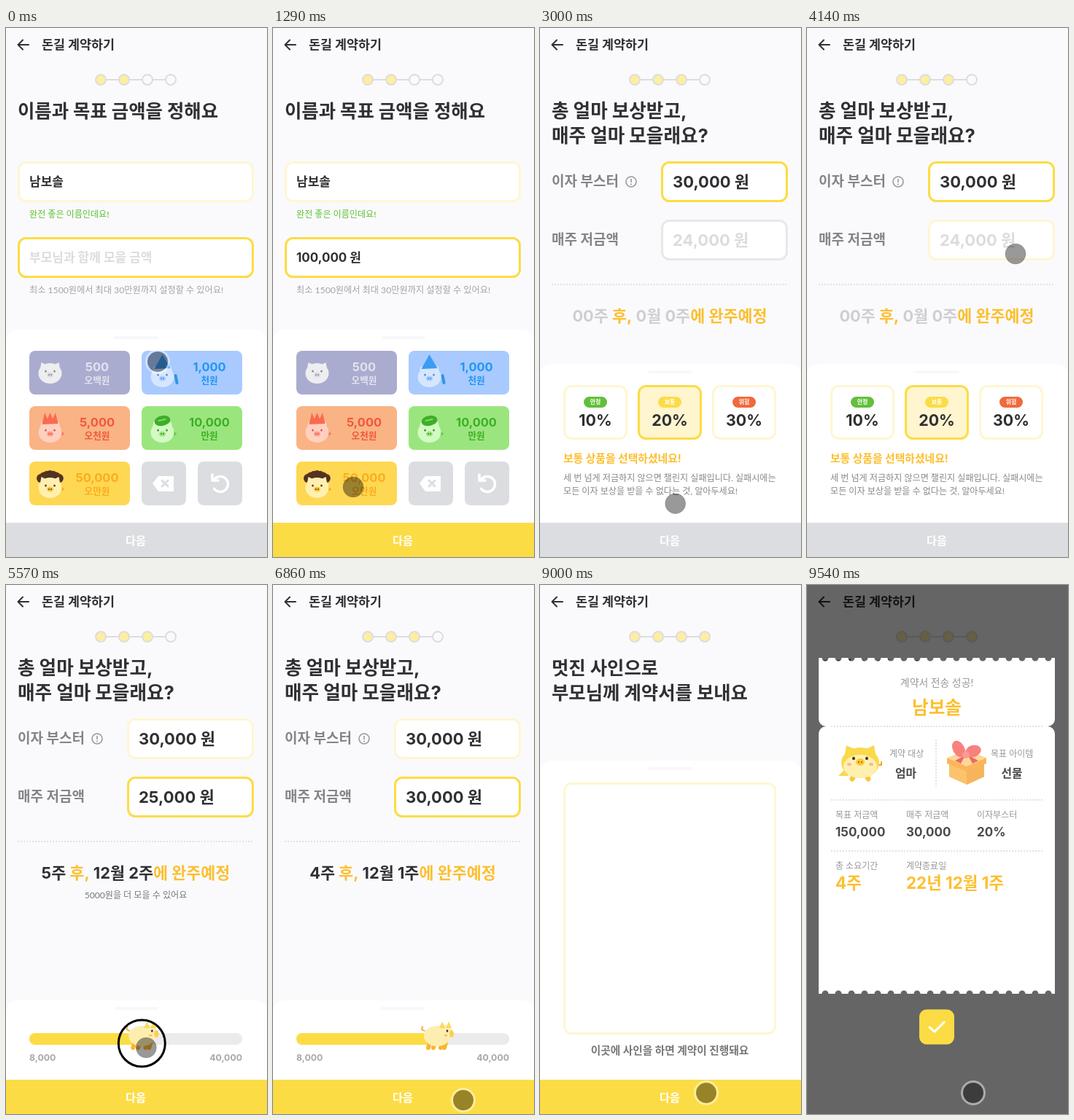
Write an HTML page with a canvas that moves like this. It is 358 by 726 pixels and loops after 9.8 s.

```html
<!DOCTYPE html>
<html lang="ko">
<head>
<meta charset="utf-8">
<title>돈길 계약하기</title>
<style>
html, body { margin: 0; width: 100%; height: 100%; overflow: hidden; background: #fafafc; }
canvas { display: block; width: 358px; height: 726px; }
</style>
</head>
<body>
<canvas id="stage"></canvas>
<script>
const W = 358, H = 726, LOOP = 9800, STEP = 1000 / 7;
const INK = '#303034', YELLOW = '#fcdc45', PALE = '#fff6d2', GOLD = '#fdbf2f', GRAY = '#dcdde1';
const NAME = '남보솔';
const canvas = document.getElementById('stage');
const c = canvas.getContext('2d');
const dpr = window.devicePixelRatio || 1;
canvas.width = W * dpr;
canvas.height = H * dpr;

// ---------- helpers ----------
const clamp = v => Math.max(0, Math.min(1, v));
const mix = (a, b, p) => a + (b - a) * p;
const part = (t, start, end) => clamp((t - start) / (end - start));
const smooth = p => p * p * (3 - 2 * p);
function ramp(t, start, dur) {
  const p = part(t, start, start + dur);
  return p < .5 ? 4 * p ** 3 : 1 - 4 * (1 - p) ** 3;
}
function setFont(size, weight) {
  c.font = `${weight} ${size}px ${weight >= 700 ? 'Inter' : 'Lato'}, "Noto Sans CJK KR", "Noto Sans CJK", sans-serif`;
}
function text(s, x, cy, size, color, weight = 700, align = 'left') {
  setFont(size, weight);
  c.textAlign = align;
  c.fillStyle = color;
  c.fillText(s, x, cy + size * .365);
}
function box(x, y, w, h, r, fill, stroke) {
  c.beginPath();
  c.roundRect(x, y, w, h, r);
  if (fill) { c.fillStyle = fill; c.fill(); }
  if (stroke) { c.strokeStyle = stroke; c.lineWidth = 3; c.stroke(); }
}
function oval(x, y, rx, ry, fill, rot = 0) {
  c.beginPath();
  c.ellipse(x, y, rx, ry, rot, 0, 7);
  c.fillStyle = fill;
  c.fill();
}
function ring(x, y, r, color, lw) {
  c.beginPath();
  c.arc(x, y, r, 0, 7);
  c.strokeStyle = color;
  c.lineWidth = lw;
  c.stroke();
}
function trace(pts) {
  c.beginPath();
  for (let i = 0; i < pts.length; i += 2) c.lineTo(pts[i], pts[i + 1]);
}
function poly(pts, fill) {
  trace(pts);
  c.fillStyle = fill;
  c.fill();
}
function line(pts, color, lw) {
  trace(pts);
  c.strokeStyle = color;
  c.lineWidth = lw;
  c.stroke();
}
function dotted(x1, y1, x2, y2) {
  c.setLineDash([2, 2]);
  c.lineCap = 'butt';
  line([x1, y1, x2, y2], '#e2e2e5', 2);
  c.setLineDash([]);
  c.lineCap = 'round';
}
function at(x, y, draw, flip = 1) {
  c.save();
  c.translate(x, y);
  c.scale(flip, 1);
  draw();
  c.restore();
}
const mirrored = draw => { at(0, 0, draw); at(0, 0, draw, -1); };
const field = (x, y, w, border) => box(x + 1.5, y + 1.5, w - 3, 53, 10, '#fff', border);

// ---------- moments of the story ----------
const FIRST = 860, TAP_GAP = 250, NEXT = 2004, PICK = 2650, FOCUS = 4280;
const DRAG = 5280, DROP = 5860, TO_SIGN = 6850, SIGN = 7740, SIGNED = 8150, SEND = 9000;

// ---------- pointer: taps with a glide between them ----------
const TAPS = [
  [0, 208, 458], [500, 294, 628],
  ...[0, 1, 2].map(i => [FIRST + i * TAP_GAP, 110, 630]),
  [NEXT, 247, 708], [PICK, 185, 655], [FOCUS, 286, 310], [DRAG, 184, 635],
  [DROP, 231, 635], [TO_SIGN, 261, 707], [SIGN, 204, 394], [SIGNED, 178, 555], [SEND, 228, 697]
];
const dragX = t => 184 + 47 * part(t, DRAG, DROP) ** 2.5;
const knobX = t => dragX(t) - 6;
const dragging = t => t >= DRAG && t < DROP;
const signing = t => t >= SIGN && t < SIGNED;

function signPoint(t) {
  const u = part(t, SIGN, SIGNED), w = 1 - u;
  return [204 * w ** 3 - 129 * u * w * w + 880 * u * u * w + 178 * u ** 3, 394 + 161 * u ** 1.09];
}
function pointerAt(t) {
  if (dragging(t)) return [dragX(t), 635];
  if (signing(t)) return signPoint(t);
  const i = TAPS.findLastIndex(k => k[0] <= t);
  const a = TAPS[i], b = TAPS[i + 1] || a;
  const gap = b[0] - a[0];
  const p = gap ? smooth(part(t, a[0] + Math.min(300, gap * .45), b[0] - Math.min(290, gap * .45))) : 0;
  return [mix(a[1], b[1], p), mix(a[2], b[2], p)];
}
function drawPointer(t) {
  const [x, y] = pointerAt(t);
  const held = dragging(t) || signing(t);
  const down = t >= SEND || !held && TAPS.some(k => t >= k[0] && t < k[0] + 120);
  oval(x, y, 14, 14, 'rgba(0,0,0,.4)');
  if (down) ring(x, y, 15.5, 'rgba(255,255,255,.45)', 3);
  else ring(x, y, 14, 'rgba(0,0,0,.12)', 1);
  if (held) ring(x - 6, y - 6, 32, '#000', 3);
}

// ---------- pigs and gift ----------
function face(body, snout, ink) {
  oval(0, 0, 16, 14, body);
  mirrored(() => {
    poly([14, -4, 12, -15, 4, -11], body);
    oval(6, -3, 1.3, 1.5, ink);
  });
  oval(0, 2, 4.5, 3.5, snout);
  mirrored(() => oval(1.5, 2, .8, 1.2, ink));
}
function spikes(count, height, color) {
  const pts = [-11, -11];
  for (let i = 0; i < count; i++) {
    const x = -11 + 22 * i / count, step = 11 / count;
    pts.push(x + step, -11 - height, x + step * 2, -12 - height * .4 * (i < count - 1));
  }
  poly(pts, color);
}
const tail = color => poly([15, -2, 20, 2, 15, 5], color);
const PIGS = [
  () => face('#eeeef0', '#dcdce3', '#85858f'),
  () => {
    line([18, -2, 20, 8], '#2f95e8', 4);
    face('#d6e6ff', '#a9cbff', '#3b8de0');
    spikes(1, 20, '#3d9cf0');
  },
  () => {
    tail('#f9795f');
    face('#ffd0c0', '#ff9f8c', '#e0523c');
    spikes(3, 16, '#fb6a50');
  },
  () => {
    tail('#69c94a');
    face('#d3fac4', '#9be57f', '#358d20');
    oval(0, -16, 11, 7, '#3fae28', -.2);
    line([-5, -16, 4, -18], '#83d966', 2);
  },
  () => {
    for (let i = 0; i < 7; i++) oval(-13 + i * 4.3, -13 - 5 * Math.sin(i * Math.PI / 6), 5.5, 6, '#553322');
    tail('#fba92d');
    face('#fff0b0', '#fdcb3c', '#553322');
  }
];
function sidePig() {
  line([-18, -7, -22, -9, -21, -13], '#f3a12c', 1.6);
  for (const x of [-11, -4, 6, 11]) line([x, 9, x - 2, 16], '#f9b62f', 6);
  oval(-1, 0, 18, 14, '#fdeeb0');
  oval(9, -4, 11, 11, '#fdeeb0');
  for (const x of [2, 11]) poly([x, -11, x + 4, -20, x + 8, -11], '#fbd95b');
  oval(19, -3, 3, 5, '#fbcf4a');
  oval(13, -7, 1.4, 1.7, '#4a3420');
  oval(11, -1, 2.3, 1.5, '#f9c06a');
}
function ticketPig() {
  line([25, 3, 29, 3, 29, -1], '#f3a12c', 2);
  poly([-20, 8, -30, 18, -16, 18], '#fbd74d');
  mirrored(() => {
    line([10, 20, 11, 22], '#f9c83b', 7);
    poly([22, -6, 19, -24, 6, -18], '#fcd84b');
  });
  oval(0, 0, 26, 21, '#fcd84b');
  oval(0, 5, 23, 16, '#fff0b0');
  mirrored(() => {
    oval(9, -6, 2, 2.3, '#4a3420');
    oval(15, 2, 3, 2, '#fbb78e');
  });
  oval(0, -1, 6, 5, '#fcca36');
  mirrored(() => oval(2, -1, 1, 1.6, '#a86a18'));
}
function gift() {
  poly([-24, -5, 24, -5, 24, 18, 0, 29, -24, 18], '#fbc36b');
  poly([24, -5, 24, 18, 0, 29, 0, 6], '#f8b45a');
  poly([-27, -8, 0, 4, 27, -8, 27, 0, 0, 11, -27, 0], '#fbb55a');
  poly([-27, -8, 0, -18, 27, -8, 0, 4], '#fdd79a');
  mirrored(() => poly([2, -11, 16, -4, 8, 0], '#ee6865'));
  oval(-11, -20, 8, 12, '#f8817d', -.5);
  oval(9, -17, 11, 8, '#f8817d', -.3);
  oval(-1, -12, 5, 5, '#fa9a94');
}

// ---------- pages ----------
const valueAt = t => t < DRAG ? 0 : 8000 + Math.round((knobX(t) - 52) / 252 * 32) * 1000;
const won = v => v.toLocaleString('en-US') + ' 원';

function amountAt(t) {
  if (t < FIRST) return t >= 140 && t < 500 ? 1000 : 0;
  return 50000 * Math.min(3, 1 + Math.floor((t - FIRST) / TAP_GAP));
}
function namePage(t) {
  const sum = amountAt(t), editing = t < 2000;
  text('이름과 목표 금액을 정해요', 16, 114, 25.4, INK);
  field(16, 183, 324, PALE);
  text(NAME, 32, 211, 17, INK);
  field(16, 287, 324, editing ? YELLOW : PALE);
  text(sum ? won(sum) : '부모님과 함께 모을 금액', 32, 315, 17, sum ? INK : '#dcdce0');
  if (!editing) return;
  text('완전 좋은 이름인데요!', 32, 256, 12.1, '#5fc130', 500);
  text('최소 1500원에서 최대 30만원까지 설정할 수 있어요!', 32, 360, 12.2, '#a4a4a8', 400);
}
function resultLine(v) {
  const weeks = Math.ceil(120000 / v), extra = weeks * v - 120000;
  const ink = v ? INK : '#cfcfd2';
  const words = v ? [weeks + '주 ', '후, ', `12월 ${weeks - 3}주`] : ['00주 ', '후, ', '0월 0주'];
  words.push('에 완주예정');
  setFont(21.8, 700);
  let x = 178 - c.measureText(words.join('')).width / 2;
  words.forEach((s, i) => {
    text(s, x, 395, 21.8, i % 2 ? GOLD : ink);
    x += c.measureText(s).width;
  });
  if (extra > 0 && v) text(extra + '원을 더 모을 수 있어요', 178, 426, 12.1, '#77777b', 400, 'center');
}
function savePage(t) {
  const v = valueAt(t), focused = t >= FOCUS;
  text('총 얼마 보상받고,', 16, 114, 25.6, INK);
  text('매주 얼마 모을래요?', 16, 148, 25.6, INK);
  text('이자 부스터', 16, 210, 19, '#858588');
  text('매주 저금액', 16, 290, 19, '#858588');
  ring(125, 211, 7, '#99999c', 1.6);
  line([125, 207.5, 125, 211.5], '#99999c', 1.6);
  oval(125, 214.4, 1, 1, '#99999c');
  field(166, 183, 174, focused ? PALE : YELLOW);
  text('30,000 원', 182, 211, 22, t < PICK ? '#dcdce0' : INK);
  field(166, 263, 174, focused ? YELLOW : t < FOCUS - 150 ? '#e8e8eb' : PALE);
  text(won(v || 24000), 182, 291, 22, v ? INK : '#dcdce0');
  dotted(16, 352, 340, 352);
  resultLine(v);
}
function signPage() {
  text('멋진 사인으로', 16, 114, 25.4, INK);
  text('부모님께 계약서를 보내요', 16, 148, 25.4, INK);
}
function header(t) {
  line([31, 23, 17, 23], INK, 2);
  line([23, 16.5, 16.5, 23, 23, 29.5], INK, 2);
  text('돈길 계약하기', 49, 23, 17.4, INK);
  line([130, 71, 226, 71], GRAY, 2);
  const done = 2 + (t > NEXT + 100) + (t > TO_SIGN + 100);
  for (let i = 0; i < 4; i++) {
    oval(130 + i * 32, 71, 7, 7, i < done ? '#feeea0' : '#fafafc');
    ring(130 + i * 32, 71, 7, GRAY, 2);
  }
}

// ---------- bottom sheets ----------
function sheet(top, buttonY, on, body) {
  if (top >= H) return;
  at(0, top, () => {
    box(0, 0, W, H, [16, 16, 0, 0], '#fff');
    box(148, 9, 61, 4, 2, '#f8f8fa');
    body();
    c.fillStyle = on ? YELLOW : GRAY;
    c.fillRect(0, buttonY, W, H);
    text('다음', 178, buttonY + 24, 15.2, '#fff', 700, 'center');
  });
}
const KEYS = [
  ['500', '오백원', '#aaaccf', '#e2e3f0'], ['1,000', '천원', '#a8caff', '#2196f3'],
  ['5,000', '오천원', '#f9b384', '#f1573c'], ['10,000', '만원', '#9be57f', '#3daf22'],
  ['50,000', '오만원', '#fed853', '#fbac1c']
];
function keypad() {
  KEYS.forEach(([num, word, bg, ink], i) => {
    const x = 32 + i % 2 * 154, y = 29 + (i >> 1) * 76;
    box(x, y, 138, 60, 8, bg);
    at(x + 28.5, y + (i ? 36 : 31), PIGS[i]);
    text(num, x + 93, y + 22, 16.4, ink, 700, 'center');
    text(word, x + 93, y + 40, 12.6, ink, 700, 'center');
  });
  box(186, 181, 61, 60, 8, GRAY);
  box(263, 181, 61, 60, 8, GRAY);
  poly([201, 211, 209, 201, 230, 201, 230, 222, 209, 222], '#fff');
  at(218, 211, () => mirrored(() => line([-4, -4, 4, 4], GRAY, 3)));
  c.beginPath();
  c.arc(294, 212, 10.5, -2.4, 2.5);
  c.strokeStyle = '#fff';
  c.lineWidth = 3.5;
  c.stroke();
  line([283, 199, 283, 207, 291, 207], '#fff', 3.5);
}
const PLANS = [['안정', '10%', '#62bf3b'], ['보통', '20%', YELLOW], ['위험', '30%', '#f0693c']];
function plans(t, open, alpha) {
  c.globalAlpha = alpha;
  PLANS.forEach(([tag, rate, color], i) => {
    const x = 32 + i * 102, picked = i === 1 && t >= PICK;
    box(x + 1.5, 30.5, 85, 72, 10, picked ? '#fff5cf' : '#fff', picked ? YELLOW : PALE);
    box(x + 28, 45, 32, 15, 7.5, color);
    text(tag, x + 44, 52.5, 8, '#fff', 700, 'center');
    text(rate, x + 44, 77, 21.4, INK, 700, 'center');
  });
  c.globalAlpha = clamp(open * 2 - 1);
  text('보통 상품을 선택하셨네요!', 32, 130, 14.8, GOLD);
  text('세 번 넘게 저금하지 않으면 챌린지 실패입니다. 실패시에는', 32, 157, 12.1, '#88888c', 400);
  text('모든 이자 보상을 받을 수 없다는 것, 알아두세요!', 32, 175, 12.1, '#88888c', 400);
  c.globalAlpha = 1;
}
function slider(t) {
  const x = knobX(t);
  box(32, 45, 292, 16, 8, '#ebebeb');
  box(32, 45, x - 32, 16, [8, 0, 0, 8], YELLOW);
  text('8,000', 32, 79, 12.3, '#a8a8ac');
  text('40,000', 324, 79, 12.3, '#a8a8ac', 700, 'right');
  at(x + 1, 49, sidePig);
}
function signPad() {
  box(33.5, 31.5, 289, 343, 10, '#fff', PALE);
  text('이곳에 사인을 하면 계약이 진행돼요', 178, 398, 14.7, '#77777b', 700, 'center');
}
// Each sheet sinks while the following one rises on the same curve.
function sheets(t) {
  const swap = start => ramp(t, start, 500);
  const rise = swap(NEXT - 8), tune = swap(FOCUS), sign = swap(TO_SIGN + 40);
  const open = ramp(t, PICK, 330);
  if (rise < 1) sheet(mix(414, H, rise), 265, t >= FIRST, keypad);
  sheet(mix(mix(mix(H, 558, rise), 461, open), H, tune), mix(121, 218, open), false,
    () => plans(t, open, clamp((rise - .4) / .6)));
  sheet(mix(mix(H, 570, tune), H, sign), 109, t >= DRAG, () => slider(t));
  sheet(mix(mix(H, 241, sign), H, ramp(t, SEND, 300)), 438, t > SIGNED, signPad);
}

// ---------- contract ticket ----------
function ticket() {
  c.beginPath();
  c.roundRect(16, 100, 324, 94, [0, 0, 10, 10]);
  c.roundRect(16, 194, 324, 367, [10, 10, 0, 0]);
  // half-round notches along both edges
  for (let i = 0; i < 18; i++) {
    const x = 25 + i * 18;
    c.moveTo(x - 4.5, 100);
    c.arc(x, 100, 4.5, Math.PI, 0, true);
    c.closePath();
    c.moveTo(x + 4.5, 561);
    c.arc(x, 561, 4.5, 0, Math.PI, true);
    c.closePath();
  }
  c.fillStyle = '#fff';
  c.fill('evenodd');
  const label = (s, x, y) => text(s, x, y, 12, '#98989c', 400);
  text('계약서 전송 성공!', 178, 134, 13.9, '#98989c', 400, 'center');
  text(NAME, 178, 168, 24.6, GOLD, 700, 'center');
  for (const y of [194, 295, 365]) dotted(33, y, 323, y);
  dotted(177, 212, 177, 277);
  at(73, 244, ticketPig);
  at(219, 245, gift);
  label('계약 대상', 113, 232);
  text('엄마', 135.5, 258, 15.8, '#4a4a4e', 700, 'center');
  label('목표 아이템', 252, 232);
  text('선물', 281, 258, 15.8, '#4a4a4e', 700, 'center');
  [['목표 저금액', '150,000'], ['매주 저금액', '30,000'], ['이자부스터', '20%']].forEach(([s, v], i) => {
    label(s, 39 + i * 97, 316);
    text(v, 39 + i * 97, 339, 17, '#4a4a4e');
  });
  label('총 소요기간', 39, 386);
  label('계약종료일', 136, 386);
  text('4주', 39, 409, 22.4, GOLD);
  text('22년 12월 1주', 136, 409, 22.4, GOLD);
  box(154, 582.5, 48, 48, 10, YELLOW);
  line([168, 607, 175, 613, 188, 600], '#fff', 3);
}

function draw(t) {
  c.setTransform(dpr, 0, 0, dpr, 0, 0);
  c.fillStyle = '#fafafc';
  c.fillRect(0, 0, W, H);
  c.lineCap = c.lineJoin = 'round';
  const pos = ramp(t, NEXT, 500) + ramp(t, TO_SIGN + 40, 500);
  [namePage, savePage, signPage].forEach((page, i) => {
    if (Math.abs(i - pos) < 1) at((i - pos) * 360, 0, () => page(t));
  });
  header(t);
  sheets(t);
  c.fillStyle = `rgba(0,0,0,${.595 * part(t, SEND, SEND + 290)})`;
  c.fillRect(0, 0, W, H);
  const p = 1 - (1 - part(t, SEND + 70, SEND + 430)) ** 3;
  if (p) at(0, (1 - p) * 630, ticket);
  drawPointer(t);
}

// Seven poses a second, timed in hundredths.
const begin = performance.now();
function tick() {
  const t = (performance.now() - begin) % LOOP;
  draw(Math.round(Math.floor((t + 4) / STEP) * STEP / 10) * 10 % LOOP);
  requestAnimationFrame(tick);
}
tick();
</script>
</body>
</html>
```
